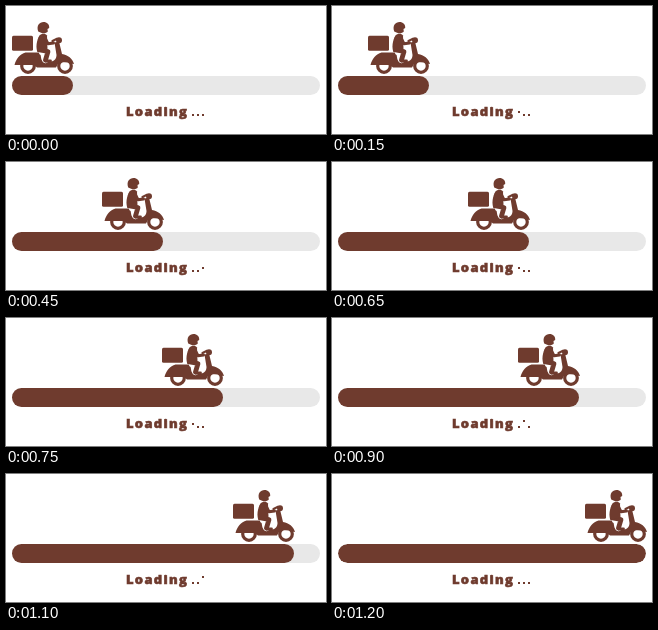
These frames come from a looping animation (320 px wide and 128 px high, 1250 ms). An HTML page:

```html
<!DOCTYPE html>
<html lang="en">
<head>
<meta charset="utf-8">
<title>Loading</title>
<style>
  html, body { margin: 0; width: 100%; height: 100%; overflow: hidden; background: #fff; }
  svg { display: block; width: 320px; height: 128px; }
  .brown { fill: #6f3b2e; }
  .line { fill: none; stroke: #6f3b2e; stroke-linecap: round; stroke-linejoin: round; }
  .gap { fill: none; stroke: #fff; stroke-linecap: round; stroke-linejoin: round; }
  text {
    font: 800 13px "Open Sans", "Noto Sans", sans-serif;
    letter-spacing: 1.3px;
    stroke: #6f3b2e;
    stroke-width: 0.6px;
  }
</style>
</head>
<body>
<svg viewBox="0 0 320 128">
  <defs>
    <clipPath id="track"><rect x="6" y="70" width="308" height="19" rx="9.5"/></clipPath>
  </defs>

  <g clip-path="url(#track)">
    <rect x="6" y="70" width="308" height="19" fill="#e8e8e8"/>
    <rect id="fill" class="brown" x="-241" y="70" width="308" height="19" rx="9.5"/>
  </g>

  <g id="scooter">
    <!-- delivery box -->
    <rect class="brown" x="6" y="29.8" width="21" height="15" rx="1.5"/>
    <!-- wheels -->
    <g fill="#fff" stroke="#6f3b2e" stroke-width="3.2">
      <circle cx="22" cy="60" r="6.3"/>
      <circle cx="59" cy="60" r="6.3"/>
    </g>
    <!-- scooter body -->
    <path class="brown" d="M8.5 59C10 53 14 48 19.5 46.5H33C36 49 34 53 37 55.5H45C49 55 50.5 52 50.5 49L48.5 36.5L53 35.5L56 48C62 49 66.5 52.5 68 58L64.5 57.5C60 55.5 56 56 52 58L50 61.5H31L28 59Z"/>
    <path class="line" stroke-width="2.2" d="M46.5 35L51 32.8"/>
    <circle class="brown" cx="53" cy="34.3" r="3"/>
    <!-- rider -->
    <path class="gap" stroke-width="6.2" d="M36 46L41.5 46.5L39.5 54"/>
    <path class="line" stroke-width="4.8" d="M33.5 44L42 45.5L39.5 54"/>
    <path class="line" stroke-width="2.8" d="M39.5 55H44.5"/>
    <path class="brown" d="M33.5 29.5C35.5 27 39.5 27 41 29.5L41.5 43.5L31.5 46C29.5 42 30.5 34 33.5 29.5Z"/>
    <path class="line" stroke-width="3" d="M38.5 31L42 37.8L47.5 37"/>
    <path class="brown" d="M32.2 25.5C30.2 19.5 33.5 16 37.5 16C41 16 43.6 18.5 43.2 22L41.5 23L41.8 25.5C40.5 27.6 36 27.6 34.5 26.5Z"/>
  </g>

  <text class="brown" x="120" y="110">Loading</text>
  <g class="brown">
    <rect class="dot" x="186" y="108" width="2" height="2"/>
    <rect class="dot" x="191" y="108" width="2" height="2"/>
    <rect class="dot" x="196" y="108" width="2" height="2"/>
  </g>
</svg>
<script>
  const STEP = 50, COUNT = 25, HOP_CYCLE = 12;

  // Steady ride with a short sprint at the end.
  const ride = i => i < 22 ? i * 10 : 221 + (i - 22) * 13;

  // Each dot takes three steps to hop, one dot after another.
  const hop = (i, dot) => {
    const away = Math.abs(i % HOP_CYCLE - (2 + dot * 4));
    return away === 0 ? -6 : away === 1 ? -3 : 0;
  };

  function play(el, pose) {
    const keys = Array.from({ length: COUNT + 1 }, (_, i) => {
      const [x, y] = pose(Math.min(i, COUNT - 1));
      return { transform: `translate(${x}px, ${y}px)`, offset: i / COUNT, easing: "step-end" };
    });
    const anim = el.animate(keys, { duration: STEP * COUNT, iterations: Infinity });
    anim.startTime = document.timeline.currentTime;
  }

  for (const id of ["fill", "scooter"])
    play(document.getElementById(id), i => [ride(i), 0]);
  document.querySelectorAll(".dot").forEach((el, dot) => play(el, i => [0, hop(i, dot)]));
</script>
</body>
</html>
```
